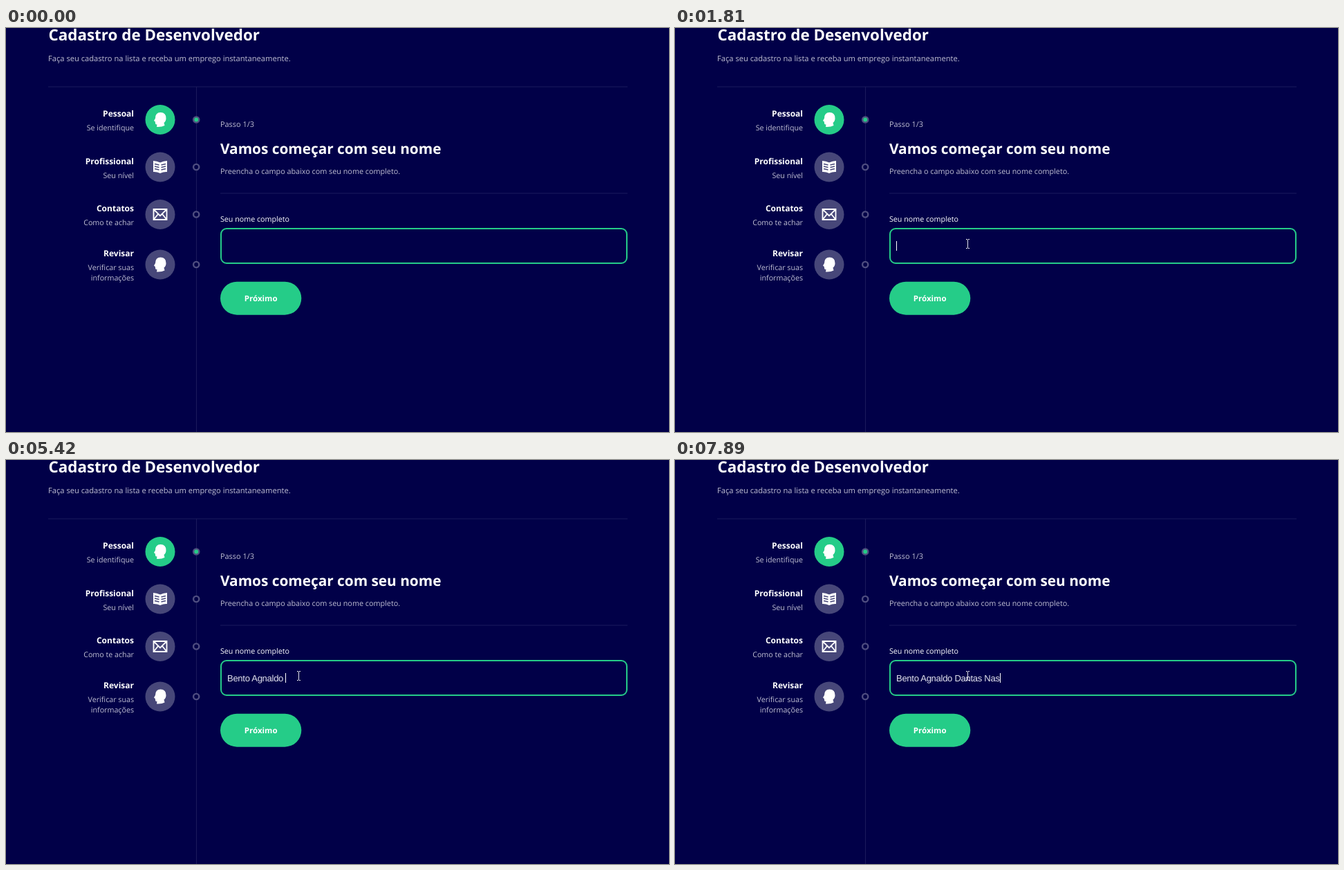
An HTML page for the animation above (8 s loop, 959 px wide and 584 px high).

```html
<!DOCTYPE html>
<html lang="pt-BR">
<head>
<meta charset="utf-8">
<title>Cadastro de Desenvolvedor</title>
<style>
  html, body { margin: 0; width: 100%; height: 100%; overflow: hidden; background: #010048; }
  svg { display: block; width: 959px; height: 584px; }
  text { font: 10.7px "Open Sans", "Noto Sans", sans-serif; fill: #bfbed2; text-rendering: geometricPrecision; }
  .bold { font-weight: 700; fill: #fff; }
  .white { fill: #fff; }
  #steps text { text-anchor: end; }
  #steps .bold { font-size: 12px; }
  #typed { font: 13px "Liberation Sans", Arial, sans-serif; letter-spacing: -.27px; fill: #e4e4ee; white-space: pre; }
  .rule { fill: none; stroke: #1b1a5c; }
</style>
</head>
<body>
<svg viewBox="0 0 959 584">
  <defs>
    <path id="head" fill="#fff" d="M-5 10.500L-4.500 7Q-7 7.500 -7 5L-7.200 3L-9 1.500L-7 -2Q-7 -10.500 .5 -10.500Q8.500 -10.500 8.500 -2Q8.500 2 5.500 4.500L6.500 8.500Q2 11 -5 10.500Z"/>
    <g id="book">
      <path fill="#fff" d="M-10 -9Q-5 -9 0 -6.500Q5 -9 10 -9V7Q5 6.500 0 9Q-5 6.500 -10 7Z"/>
      <path fill="none" stroke="#474779" stroke-width="1.500" d="M-8 -4.500L-1.500 -3M-8 -1L-1.500 .5M-8 2.500L-1.500 4M8 -4.500L1.500 -3M8 -1L1.500 .5M8 2.500L1.500 4"/>
    </g>
    <path id="mail" fill="none" stroke="#fff" stroke-width="1.800" d="M-9.500 -7.500H9.500V7.500H-9.500ZL0 2L9.500 -7.500M-9.500 7.500L-3 -.5M9.500 7.500L3 -.5"/>
  </defs>

  <path class="rule" d="M61 85H899M275.500 85V584M310 239H899"/>
  <text class="bold" x="61.500" y="17.500" style="font-size:22.400px">Cadastro de Desenvolvedor</text>
  <text x="61" y="48" style="font-size:11.160px">Faça seu cadastro na lista e receba um emprego instantaneamente.</text>

  <g id="steps"></g>

  <text x="310" y="143" style="font-size:10.900px">Passo 1/3</text>
  <text class="bold" x="310" y="181.500" style="font-size:20.800px">Vamos começar com seu nome</text>
  <text x="310" y="210.500" style="font-size:10.800px">Preencha o campo abaixo com seu nome completo.</text>
  <text class="white" x="310" y="279.500">Seu nome completo</text>
  <rect x="311" y="290" width="587" height="50" rx="8" fill="none" stroke="#25cc88" stroke-width="2"/>
  <rect x="310" y="366.700" width="117.300" height="48" rx="24" fill="#25cc88"/>
  <text class="bold" x="368.700" y="395" text-anchor="middle" style="font-size:11.500px">Próximo</text>

  <text id="typed" x="320" y="320"></text>
  <rect id="caret" y="308" width="1" height="14" fill="#fff"/>
  <path id="beam" fill="none" stroke="#e6e6ee" d="M-2.500 -6.500H-.5M.5 -6.500H2.500M0 -6V6M-2.500 6.500H-.5M.5 6.500H2.500"/>
  <path id="arrow" fill="#fff" stroke="#000" d="M.5 .5V16.500L4.200 13L6.700 18.500L9 17.500L6.600 12H11.500Z"/>
</svg>
<script>
const $ = id => document.getElementById(id);
const LOOP = 8000, BLINK = 530, CLICK = 750;
const GREEN = '#25cc88', GREY = '#474779';

// Sidebar: icon, circle centre, title baseline, title, then caption lines
const steps = [
  ['head', 132.5, 128, 'Pessoal', 'Se identifique'],
  ['book', 201, 196.5, 'Profissional', 'Seu nível'],
  ['mail', 269.5, 265, 'Contatos', 'Como te achar'],
  ['head', 342, 330, 'Revisar', 'Verificar suas', 'informações'],
];
$('steps').innerHTML = steps.map(([icon, cy, y, title, ...lines], i) => `
  <text class="bold" x="185" y="${y}">${title}</text>
  ${lines.map((line, n) => `<text x="185" y="${y + 20 + n * 14.5}">${line}</text>`).join('')}
  <circle cx="223" cy="${cy}" r="21.5" fill="${i ? GREY : GREEN}"/>
  <use href="#${icon}" x="223" y="${cy}"/>
  <circle cx="275.2" cy="${cy}" r="4.1" fill="${i ? '#010048' : GREEN}" stroke="#4f4e80" stroke-width="2.4"/>`).join('');

const fullName = 'Bento Agnaldo Dantas Nas';
const keyTimes = [1880, 2280, 2480, 2680, 2750, 3020, 3300, 3760, 3890, 4020, 4820, 5020,
  5150, 5420, 5890, 6160, 6290, 6420, 6620, 6690, 7290, 7560, 7830, 7890];
const mousePath = [[783, 487], [700, 452], [592, 402], [500, 352], [440, 314], [425, 303], [423, 307], [423, 312]];

const show = (el, on) => el.setAttribute('visibility', on ? 'visible' : 'hidden');

function drawMouse(t) {
  const started = t >= 130;
  const index = Math.min(mousePath.length - 1, Math.max(0, Math.floor((t - 130) / 68)));
  const [x, y] = mousePath[index];
  const inField = y < 341;
  $('beam').setAttribute('transform', `translate(${x + .5} ${y})`);
  $('arrow').setAttribute('transform', `translate(${x} ${y})`);
  show($('beam'), started && inField);
  show($('arrow'), started && !inField);
}

function drawField(t) {
  const count = keyTimes.filter(k => k <= t).length;
  const since = t - (count ? keyTimes[count - 1] : CLICK);
  const typed = $('typed');
  typed.textContent = fullName.slice(0, count);
  const width = count ? typed.getComputedTextLength() : 0;
  $('caret').setAttribute('x', Math.round(320 + width));
  show($('caret'), since >= 0 && since % (2 * BLINK) < BLINK);
}

const start = performance.now();
function frame() {
  const t = (performance.now() - start) % LOOP;
  drawMouse(t);
  drawField(t);
  requestAnimationFrame(frame);
}
frame();
</script>
</body>
</html>
```
